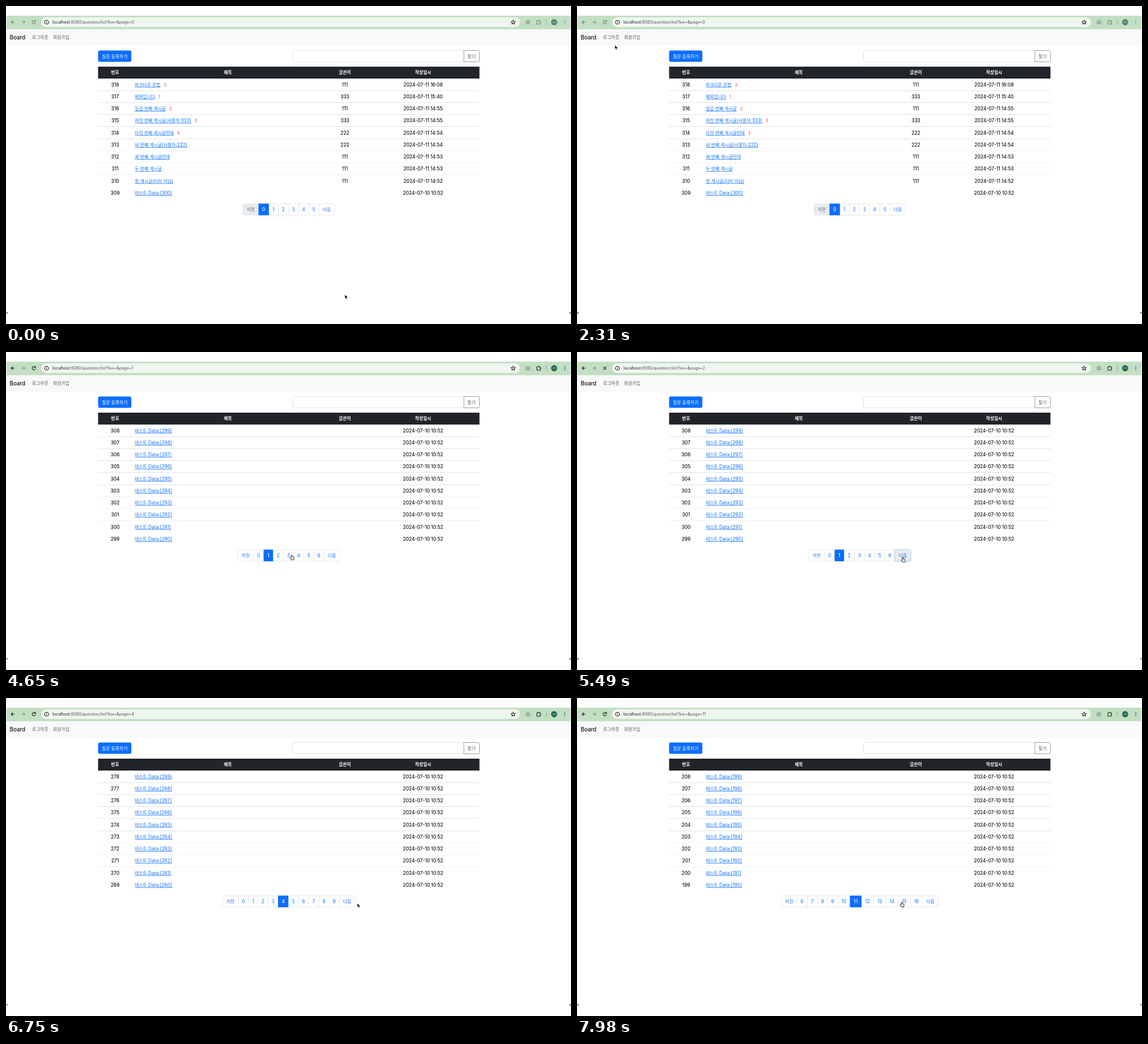
Animation of 997 by 561 pixels, one loop 8000 ms. Source, as an HTML page:

```html
<!DOCTYPE html>
<html lang="ko">
<head>
<meta charset="utf-8">
<title>Board</title>
<style>
  html, body { margin: 0; width: 100%; height: 100%; overflow: hidden; background: #fff; }
  svg { display: block; width: 997px; height: 561px; }
  text { font: 8.3px Inter, "Noto Sans CJK KR", "Noto Sans CJK JP", sans-serif; fill: #111; white-space: pre; }
  .ko { font-size: .935em; }
  .mid { text-anchor: middle; }
  .cell { font-weight: 500; }
  .head { font-weight: 700; fill: #fff; }
  .link { fill: #0d6efd; text-decoration: underline; }
  .icon { fill: none; stroke-width: 1.1; stroke-linecap: round; stroke-linejoin: round; }
</style>
</head>
<body>
<svg viewBox="0 0 997 561">
  <g id="page"></g>
  <g id="pointer" stroke-linejoin="round">
    <path id="arrow" d="M0 0V7.2L1.7 5.7L2.9 8.4L4.2 7.8L3 5.2H5.2Z" fill="#000" stroke="#fff" stroke-width=".5"/>
    <path id="hand" d="M-.9 .7Q0 -.4 .8 .7V3L3.6 3.6Q4.4 4 4.2 5L3.6 8.6H-.6L-3 5.3Q-2.6 4.2 -.9 5.4Z" fill="#fff" stroke="#111" stroke-width=".9"/>
  </g>
</svg>
<script>
const LOOP = 8000, ACTIVATED = 2600, LOAD_TIME = 90;
// [time shown, page number]
const visits = [[0, 0], [4140, 1], [5550, 2], [6000, 3], [6480, 4], [7170, 7], [7770, 11]];
// [time, x, y] of the pointer tip
const track = [
  [0, 598, 509], [810, 598, 509], [1400, 410, 366], [1500, 398, 361], [1620, 380, 345],
  [2310, 67, 69], [2500, 60, 58], [3150, 60, 58], [3800, 466, 358], [3930, 469, 356],
  [4400, 469, 356], [5050, 575, 362], [5550, 575, 362], [5800, 585, 362], [6000, 585, 362],
  [6250, 594, 362], [6550, 596, 362], [6750, 620, 362], [6900, 610, 362], [7080, 543, 360],
  [7250, 543, 360], [7600, 573, 360], [8000, 573, 360]
];
const posts = [
  ['마크다운 문법', 3, '111', '11 16:08'], ['제목입니다', 1, '333', '11 15:40'],
  ['일곱 번째 게시글', 2, '111', '11 14:55'], ['여섯 번째 게시글(사용자:333)', 5, '333', '11 14:55'],
  ['다섯 번째 게시글인데', 5, '222', '11 14:54'], ['네 번째 게시글(사용자:222)', '', '222', '11 14:54'],
  ['세 번째 게시글인데', '', '111', '11 14:53'], ['두 번째 게시글', '', '111', '11 14:53'],
  ['첫 게시글(더미 아님)', '', '111', '11 14:52']
];
const el = id => document.getElementById(id);

const korean = s => String(s).replace(/[가-힣]+/g, '<tspan class="ko">$&</tspan>');
const text = (x, y, s, cls = '', style = '') =>
  `<text x="${x}" y="${y}" class="${cls}" style="${style}">${korean(s)}</text>`;
const rect = (x, y, w, h, fill, more = '') =>
  `<rect x="${x}" y="${y}" width="${w}" height="${h}" fill="${fill}" ${more}/>`;
const icon = (d, color) => `<path class="icon" d="${d}" stroke="${color}"/>`;

function toolbar(urlPage, loading, active) {
  const dim = '#7f9c80', ink = active ? '#17251a' : '#6d866f';
  const reload = loading ? 'M46.8 26.2l4.6 4.6m0-4.6l-4.6 4.6'
    : 'M51.9 27.2A3 3 0 1 0 52 29.6M52 25.3V27.4H49.9';
  const dots = [26, 28.6, 31.2].map(y => `<circle cx="986" cy="${y}" r=".8" fill="${ink}"/>`).join('');
  return rect(1, 17, 995, 24, '#c3dfc3') + rect(62, 20, 845, 17, '#eff6ee', 'rx="8.5"') +
    icon('M14.8 28.5H9.2m2.5-2.5L9.2 28.5l2.5 2.5', ink) +
    icon('M27.7 28.5h5.6m-2.5-2.5l2.5 2.5l-2.5 2.5', dim) +
    icon(reload, ink) +
    '<circle cx="71.5" cy="28.6" r="5.8" fill="#fff"/>' +
    icon('M71.5 25a3.6 3.6 0 1 0 .01 0M71.5 28.3v2M71.5 26.7v.1', '#222') +
    `<text x="82" y="31.2" style="font-size:7.2px;fill:#555"><tspan fill="#1b1b1b">localhost:</tspan>8080/question/list?kw=&amp;page=${urlPage}</text>` +
    icon('M895 24.7l1.1 2.6 2.8.2-2.2 1.8.7 2.7-2.4-1.5-2.4 1.5.7-2.7-2.2-1.8 2.8-.2z', '#333') +
    icon('M917.8 26.3h1.5l.7-1h2l.7 1h1.5v5.2h-6.4zM921 27.6a1.3 1.3 0 1 0 .01 0', dim) +
    icon('M936.8 26h2.2v-.7h1.6v.7h2.2v2.1h.6v1.5h-.6v2.4h-6z', ink) +
    rect(953, 24, 1, 9, '#8fb290') +
    `<circle cx="967.3" cy="28.6" r="5.3" fill="${active ? '#0f5a4c' : '#44796b'}"/>` +
    text(967.3, 30.2, '회원', 'mid', 'font-size:4.5px;fill:#dcebe6') + dots;
}

function header() {
  return rect(1, 41, 995, 29.5, '#f8f9fa') +
    text(6.5, 59, 'Board', 'cell', 'font-size:9.8px') +
    text(46, 58.4, '로그아웃', '', 'fill:#555') + text(83, 58.4, '회원가입', '', 'fill:#555') +
    rect(162.5, 78.5, 58.7, 20, '#0d6efd', 'rx="3"') +
    text(191.8, 91.6, '질문 등록하기', 'mid cell', 'fill:#fff') +
    rect(505.5, 78.5, 303, 20, '#fff', 'rx="3" stroke="#dee2e6"') +
    '<path d="M808 78.5H832.5a3 3 0 0 1 3 3V95.5a3 3 0 0 1-3 3H808Z" fill="#fff" stroke="#7c848b" stroke-width=".8"/>' +
    text(821.5, 91.6, '찾기', 'mid', 'fill:#555');
}

function table(page) {
  const columns = [[192.5, '번호'], [391.3, '제목'], [598, '글쓴이'], [736, '작성일시']];
  let out = rect(162.5, 107, 673, 21, '#212529') +
    columns.map(([x, name]) => text(x, 120.3, name, 'mid head')).join('');
  for (let i = 0; i < 10; i++) {
    const id = 318 - page * 10 - i, y = 141.7 + i * 21.25;
    const [title, replies, author, date] =
      (page === 0 && posts[i]) || [`테스트 Data:[${id - 9}]`, '', '', '10 10:52'];
    out += text(192.5, y, id, 'mid cell') +
      `<text x="227.3" y="${y}"><tspan class="link">${korean(title)}</tspan>` +
      `<tspan dx="6" style="font-size:7.2px;fill:#dc3545">${replies}</tspan></text>` +
      text(598, y, author, 'mid cell') + text(736, y, '2024-07-' + date, 'mid cell');
    if (i < 8) out += rect(162.5, Math.round(y + 7), 673, 1, i < 5 ? '#dee2e6' : '#eff1f3');
  }
  return out;
}

function pagerItems(page) {
  const labels = ['이전'];
  for (let n = Math.max(0, page - 5); n <= page + 5; n++) labels.push(String(n));
  labels.push('다음');
  const glyph = c => c === '1' ? 3.6 : c < ':' ? 5.2 : 7.3;
  const items = labels.map(label => ({ label, w: [...label].reduce((w, c) => w + glyph(c), 12.8) }));
  let x = 499 - items.reduce((sum, item) => sum + item.w, 0) / 2;
  for (const item of items) { item.x = x; x += item.w; }
  return items;
}

function pager(items, page, hot) {
  const last = items[items.length - 1], x0 = items[0].x, width = last.x + last.w - x0;
  let out = '', marks = '';
  items.forEach(({ label, x, w }, i) => {
    const current = label === String(page), disabled = i === 0 && page === 0;
    const fill = current ? '#0d6efd' : disabled || label === hot ? '#e9ecef' : '#fff';
    out += rect(x, 349, w, 20, fill, i === 0 || label === '다음' ? 'rx="3"' : '');
    if (i) out += rect(x, 349, .8, 20, current ? '#0d6efd' : '#dee2e6');
    if (label === hot) marks += rect(x - .5, 348.5, w + 1, 21, 'none', 'rx="3" stroke="#c2dbfe" stroke-width="1.5"');
    marks += text(x + w / 2, 361.9, label, 'mid' + (current ? ' cell' : ''),
      `fill:${current ? '#fff' : disabled ? '#5c646b' : '#0d6efd'}`);
  });
  return out + rect(x0, 348.9, width, 20, 'none', 'rx="3" stroke="#dee2e6" stroke-width=".8"') +
    (page ? '' : '') + marks +
    items.filter(item => item.label === String(page)).map(item =>
      rect(item.x, 348.6, item.w, 20.6, '#0d6efd') +
      text(item.x + item.w / 2, 361.9, item.label, 'mid cell', 'fill:#fff')).join('');
}

const corners = '<path d="M1 540v2h1.5zM996 540v2h-1.5z" fill="#111" stroke="#111" stroke-width=".6"/>';

function pointerAt(t) {
  const i = track.findIndex(([time]) => time > t);
  const [t0, x0, y0] = track[i - 1], [t1, x1, y1] = track[i];
  const p = (t - t0) / (t1 - t0), k = p * p * (3 - 2 * p);
  return [x0 + (x1 - x0) * k, y0 + (y1 - y0) * k];
}

let shown = '';
function frame() {
  const t = performance.now() % LOOP;
  const page = visits.filter(([time]) => time <= t).pop()[1];
  const next = visits.find(([time]) => time > t);
  const loading = !!next && next[0] - t <= LOAD_TIME;
  const active = t >= ACTIVATED;
  const items = pagerItems(page);
  const [x, y] = pointerAt(t);
  const target = y > 349 && y < 369 &&
    items.find(item => x >= item.x && x < item.x + item.w && !(page === 0 && item.label === '이전'));
  const hot = target && target.label === '다음' ? '다음' : '';

  const key = [page, loading, active, hot].join();
  if (key !== shown) {
    shown = key;
    el('page').innerHTML = toolbar(loading ? next[1] : page, loading, active) +
      header() + table(page) + pager(items, page, hot) + corners;
  }
  el('pointer').setAttribute('transform', `translate(${x} ${y})`);
  el('arrow').style.display = target ? 'none' : '';
  el('hand').style.display = target ? '' : 'none';
  requestAnimationFrame(frame);
}
frame();
</script>
</body>
</html>
```
